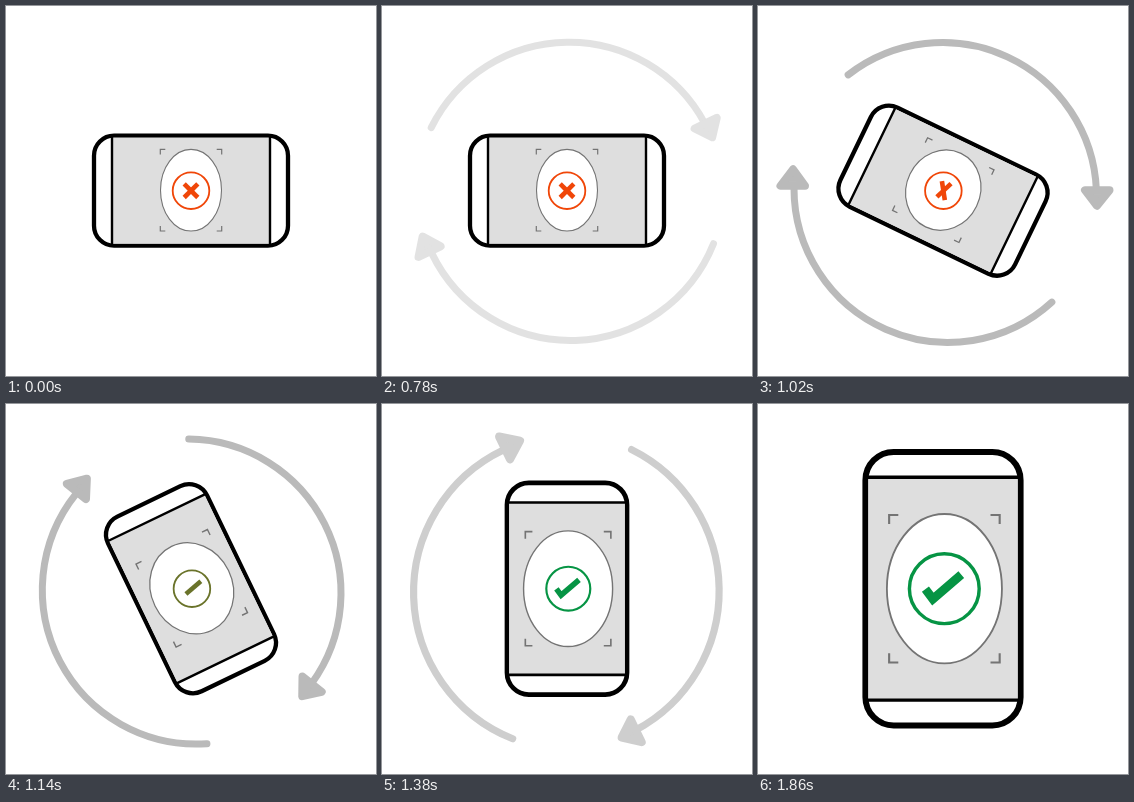
Recreate the animation shown at these times as an HTML page. Size 370 by 370 pixels, loop 2.34 s.

```html
<!DOCTYPE html>
<html lang="en">
<head>
<meta charset="utf-8">
<title>Rotate the phone</title>
<style>
  html, body { margin: 0; width: 100%; height: 100%; overflow: hidden; background: #fff; }
  svg { display: block; width: 100vw; height: 100vh; }
  path, line, circle, ellipse, rect { fill: none; }
  #arrows { stroke: #bababa; stroke-width: 7; stroke-linecap: round; stroke-linejoin: round; }
  #arrows .head { fill: #bababa; stroke-width: 8; }
  #phone { stroke: #000; }
  #phone .body { fill: #fff; stroke-width: 4.3; }
  #phone .screen { fill: #dedede; stroke: none; }
  #phone .edge { stroke-width: 2.4; }
  #oval { fill: #fff; stroke: #747474; }
  #corners { stroke: #747474; }
  #ring { stroke-width: 1.8; }
  #tick, #cross { stroke-width: 4.6; }
</style>
</head>
<body>
<svg viewBox="0 0 370 370">
  <g id="arrows">
    <path d="M90 69A154 154 0 0 1 338.4 184"/>
    <path class="head" d="M327 184H351.5L339 199.5Z"/>
    <path d="M294 296A154 154 0 0 1 36 182"/>
    <path class="head" d="M22.5 180H47L35 163.5Z"/>
  </g>
  <g id="phone">
    <rect class="body" x="-97" y="-55" width="194" height="110" rx="20"/>
    <rect class="screen" x="-79" y="-53" width="158" height="106"/>
    <path class="edge" d="M-79 -54V54M79 -54V54"/>
    <ellipse id="oval"/>
    <path id="corners"/>
  </g>
  <g id="icon">
    <circle id="ring" r="18.3"/>
    <path id="tick"/>
    <line id="cross" x1="-6.8" y1="-6.8" x2="6.8" y2="6.8"/>
  </g>
</svg>
<script>
  const LOOP = 2340, STEP = 60;
  const CENTER = [185, 184.7];
  const ARROW_REST = 25.7;
  const ORANGE = [240, 70, 8], GREEN = [6, 148, 68];

  const el = id => document.getElementById(id);
  const set = (id, attrs) => {
    for (const name in attrs) el(id).setAttribute(name, attrs[name]);
  };
  const mix = (a, b, k) => a + (b - a) * k;
  const progress = (t, from, to) => Math.min(1, Math.max(0, (t - from) / (to - from)));
  const quad = k => k < 0.5 ? 2 * k * k : 1 - 2 * (1 - k) ** 2;

  // Constant speed with a short ramp at both ends
  function glide(k, ramp = 0.22) {
    if (k > 0.5) return 1 - glide(1 - k, ramp);
    return (k < ramp ? k * k / (2 * ramp) : k - ramp / 2) / (1 - ramp);
  }

  function cornerMarks(w, h, arm) {
    let d = '';
    for (const sx of [-1, 1]) for (const sy of [-1, 1]) {
      d += `M${sx * (w - arm)} ${sy * h}H${sx * w}V${sy * (h - arm)}`;
    }
    return d;
  }

  function drawArrows(t, turn, zoom) {
    const fadeIn = progress(t, 720, 900) ** 0.8;
    const fadeOut = 1 - progress(t, 1320, 1500) ** 1.1;
    const [x, y] = CENTER;
    set('arrows', {
      opacity: fadeIn * fadeOut,
      transform: `translate(${x} ${y}) rotate(${90 * turn - ARROW_REST}) scale(${1 + 0.11 * zoom}) translate(${-x} ${-y})`
    });
  }

  function drawPhone(turn, zoom) {
    set('phone', {
      transform: `translate(${CENTER}) rotate(${90 * turn}) scale(${1 + 0.41 * zoom})`
    });
    const cy = mix(-0.5, -1, turn);
    set('oval', {
      cy, rx: mix(30.5, 53, turn), ry: 40.8, 'stroke-width': mix(1.1, 1.3, turn)
    });
    set('corners', {
      d: cornerMarks(mix(30.7, 52.3, turn), mix(40.8, 39.2, turn), mix(5, 6.5, turn)),
      transform: `translate(0 ${cy})`,
      'stroke-width': mix(1.2, 1.5, turn)
    });
  }

  function drawIcon(t, turn, zoom) {
    const tint = progress(t, 1020, 1230);
    const color = ORANGE.map((c, i) => Math.round(mix(c, GREEN[i], tint)));
    set('icon', {
      stroke: `rgb(${color})`,
      transform: `translate(${mix(185, 186.3, turn)} 184.7) scale(${1 + 0.907 * zoom})`
    });

    // One bar of the cross folds onto the other, then the short arm grows
    const fold = Math.min(1, turn / 0.71);
    const arm = progress(t, 1140, 1260);
    const bend = [mix(-6.8, -6, fold), mix(6.8, 5.4, fold)];
    const tip = [mix(6.8, 8.9, fold), mix(-6.8, -7.4, fold)];
    const start = arm ? `M${bend[0] - 3.9 * arm} ${bend[1] - 5.2 * arm}L` : 'M';
    set('tick', { d: `${start}${bend}L${tip}` });
    set('cross', { transform: `rotate(${90 * fold})`, opacity: fold < 1 ? 1 : 0 });
  }

  function draw(now) {
    const t = Math.floor(now % LOOP / STEP) * STEP;
    const turn = glide(progress(t, 900, 1260));
    const zoom = quad(progress(t, 1320, 1500));
    drawArrows(t, turn, zoom);
    drawPhone(turn, zoom);
    drawIcon(t, turn, zoom);
  }

  const begin = performance.now();
  function tickClock() {
    draw(performance.now() - begin);
    requestAnimationFrame(tickClock);
  }
  tickClock();
</script>
</body>
</html>
```
